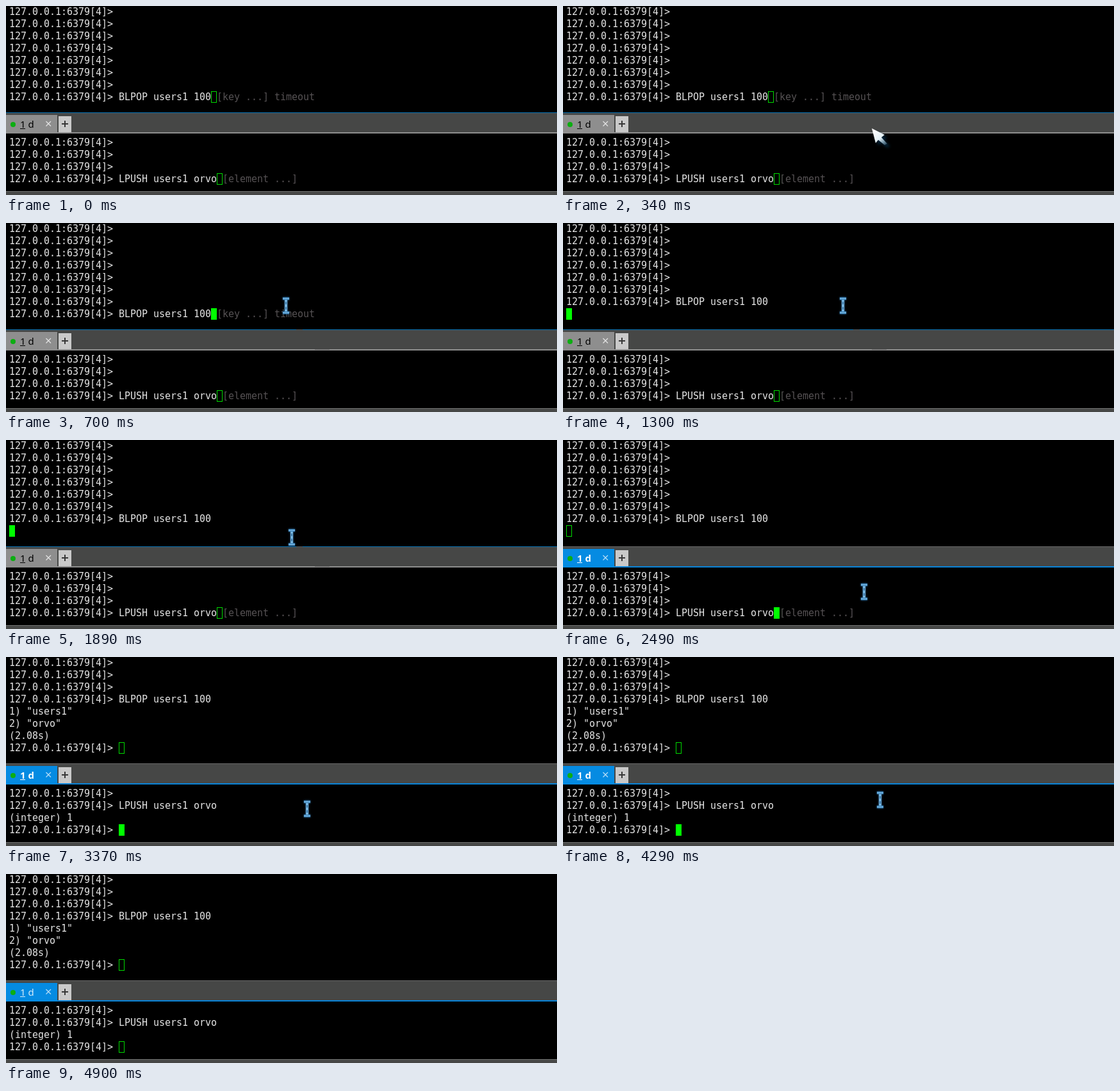
Animation, 860 px wide and 295 px high, one loop 4.97 s. Source, as an HTML page with a canvas:

```html
<!DOCTYPE html>
<html>
<head>
<meta charset="utf-8">
<style>
html, body { margin: 0; height: 100%; overflow: hidden; background: #000; }
canvas { display: block; }
</style>
</head>
<body>
<canvas id="stage" width="860" height="295"></canvas>
<script>
const ctx = document.getElementById('stage').getContext('2d');
const LOOP = 4970, CELL = 9, ROW = 19, LEFT = 5;
const PROMPT = '127.0.0.1:6379[4]>';
const POP = PROMPT + ' BLPOP users1 100';
const PUSH = PROMPT + ' LPUSH users1 orvo';
const prompts = n => Array(n).fill(PROMPT);

// Pointer poses: start time, x, y, shape
const poses = [
  [0, 0, 0, ''],
  [70, 588, 60, 'beam'], [140, 556, 96, 'beam'], [200, 527, 133, 'beam'],
  [270, 500, 171, 'arrow'], [340, 482, 191, 'arrow'], [400, 466, 177, 'arrow'],
  [470, 457, 153, 'beam'], [540, 437, 128, 'beam'], [610, 446, 126, 'beam'],
  [700, 437, 129, 'beam'],
  [1820, 438, 133, 'beam'], [1890, 446, 152, 'beam'], [1950, 454, 172, 'arrow'],
  [2020, 462, 195, 'arrow'], [2080, 465, 227, 'beam'], [2150, 469, 239, 'beam'],
  [2220, 470, 237, 'beam'],
  [4290, 495, 223, 'beam'], [4360, 560, 180, 'arrow'], [4430, 670, 121, 'beam'],
  [4500, 774, 57, 'beam'], [4570, 0, 0, '']
];

function rect(x, y, w, h, color) {
  ctx.fillStyle = color;
  ctx.fillRect(x, y, w, h);
}

function line(color, width, ...points) {
  ctx.strokeStyle = color;
  ctx.lineWidth = width;
  ctx.beginPath();
  for (let i = 0; i < points.length; i += 4) {
    ctx.moveTo(points[i], points[i + 1]);
    ctx.lineTo(points[i + 2], points[i + 3]);
  }
  ctx.stroke();
}

function mono(text, col, baseline, color) {
  ctx.font = '15px "DejaVu Sans Mono", monospace';
  ctx.fillStyle = color;
  [...text].forEach((c, i) => ctx.fillText(c, LEFT + (col + i) * CELL, baseline));
}

function terminal(top, lines, hint, filled) {
  lines.forEach((text, i) => mono(text, 0, top + 14 + i * ROW, '#e4e4e4'));
  const last = lines.length - 1, col = lines[last].length;
  const x = LEFT + col * CELL, y = top + last * ROW;
  mono(hint, col + 1, y + 14, '#565254');
  if (filled) rect(x, y, CELL, 18, '#00ff00');
  else {
    ctx.strokeStyle = '#00d800';
    ctx.lineWidth = 1;
    ctx.strokeRect(x + .5, y + .5, CELL - 1, 17);
  }
}

function tabBar(active, bold, smudged) {
  rect(0, 166, 860, 33, '#464746');
  rect(0, 166, 860, 1, active ? '#696969' : '#0872b4');
  rect(0, 197, 860, 2, active ? '#0883d8' : '#8e8e8e');
  rect(0, 170, 80, 29, active ? '#058be2' : '#8e8e8e');
  if (smudged) {
    rect(453, 166, 10, 1, '#4d565c');
    rect(482, 197, 23, 1, '#6c6c6c');
  }
  ctx.fillStyle = '#0cae12';
  ctx.beginPath();
  ctx.arc(11, 185, 4, 0, 7);
  ctx.fill();

  const ink = !active ? '#000' : bold ? '#fff' : '#d8ecfa';
  ctx.font = (bold ? 'bold ' : '') + '15px "Noto Sans", "Open Sans", sans-serif';
  ctx.fillStyle = ink;
  ctx.fillText('1 d', 22, 190);
  rect(22, 191, 8, 1, ink);
  line(active ? '#b9dff7' : '#e4e4e4', 1.2, 62.5, 180, 70, 187.5, 70, 180, 62.5, 187.5);

  rect(82, 172, 20, 25, '#c9c9c9');
  line('#383838', 2, 87, 184, 97, 184, 92, 179, 92, 189);
  rect(0, 289, 860, 6, '#464746');
  rect(0, 289, 860, 1, '#747474');
}

function beam(x, y) {
  const strokes = [x - 5, y - 11, x + 5, y - 11, x, y - 11, x, y + 11, x - 5, y + 11, x + 5, y + 11];
  ctx.save();
  ctx.shadowColor = '#2c71a6';
  ctx.shadowBlur = 3;
  line('#3c83b9', 4, ...strokes);
  ctx.restore();
  line('#69a9d6', 2, x - 5, y - 11, x + 5, y - 11, x - 5, y + 11, x + 5, y + 11);
  line('#75b3de', 4, x, y - 9, x, y + 9);
  line('#27608e', 1.5, x, y - 6, x, y - 2, x, y + 2, x, y + 6);
}

function arrow(x, y) {
  ctx.save();
  ctx.translate(x, y);
  const shade = ctx.createLinearGradient(3, 3, 24, 27);
  shade.addColorStop(0, '#fff');
  shade.addColorStop(.5, '#e4f0f6');
  shade.addColorStop(.75, '#7795a8');
  shade.addColorStop(1, '#0b2638');
  ctx.shadowColor = '#04243a';
  ctx.shadowBlur = 4;
  ctx.shadowOffsetX = ctx.shadowOffsetY = 4;
  ctx.fillStyle = shade;
  ctx.fill(new Path2D('M0 0L20 10L15 14L24 24L20 26L10 18L6 23Z'));
  ctx.restore();
}

const pointers = { beam, arrow };

function draw(t) {
  rect(0, 0, 860, 295, '#000');
  const popped = t >= 3370, active = t >= 2420;

  const upper = popped
    ? [...prompts(3), POP, '1) "users1"', '2) "orvo"', '(2.08s)', PROMPT + ' ']
    : t >= 1300 ? [...prompts(6), POP, ''] : [...prompts(7), POP];
  terminal(133 - 7 * ROW, upper, t < 1300 ? '[key ...] timeout' : '', t >= 700 && t < 2350);

  const lower = popped
    ? [PROMPT, PUSH, '(integer) 1', PROMPT + ' ']
    : [...prompts(3), PUSH];
  terminal(204, lower, popped ? '' : '[element ...]', t >= 2490 && t < 4900);

  tabBar(active, active && t < 4900, t >= 540 && !active);
  const [, x, y, shape] = poses.findLast(p => p[0] <= t);
  if (shape) pointers[shape](x, y);
}

function tick() {
  draw(performance.now() % LOOP);
  requestAnimationFrame(tick);
}
tick();
</script>
</body>
</html>
```
